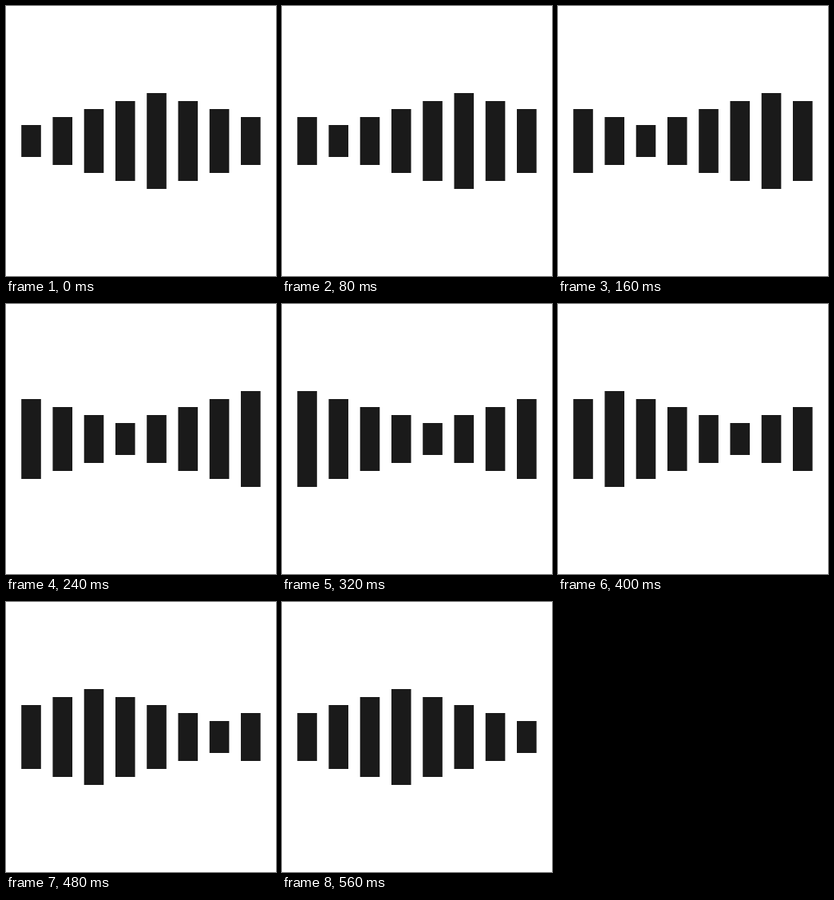
Recreate the animation shown at these times as an HTML page. Size 338 px wide and 338 px high, loop 640 ms.

```html
<!DOCTYPE html>
<html lang="en">
<head>
<meta charset="utf-8">
<title>Wave bars</title>
<style>
  html, body { margin: 0; width: 100%; height: 100%; overflow: hidden; background: #fff; }
  svg { display: block; width: 100%; height: 100%; }
  rect { fill: #1a1a1a; transform-origin: 0 169px; }
</style>
</head>
<body>
<svg id="stage" viewBox="0 0 338 338"></svg>
<script>
const COUNT = 8, STEP_MS = 80;
const LEFT = 19.2, PITCH = 39.26, WIDTH = 24.6;
const CENTER = 169, MAX_HEIGHT = 120;

// The triangle wave runs from 40 up to 120 and back, one bar to the right per step.
const heightAt = (bar, step) => {
  const phase = (bar - step + COUNT) % COUNT;
  return MAX_HEIGHT - 20 * Math.abs(4 - phase);
};

const stage = document.getElementById("stage");
for (let bar = 0; bar < COUNT; bar++) {
  const rect = document.createElementNS("http://www.w3.org/2000/svg", "rect");
  const box = { x: LEFT + bar * PITCH, y: CENTER - MAX_HEIGHT / 2, width: WIDTH, height: MAX_HEIGHT };
  for (const [name, value] of Object.entries(box)) rect.setAttribute(name, value);
  stage.append(rect);

  const keyframes = Array.from({ length: COUNT + 1 }, (_, step) => ({
    offset: step / COUNT,
    easing: "steps(1, end)",
    transform: `scaleY(${heightAt(bar, step % COUNT) / MAX_HEIGHT})`
  }));
  rect.animate(keyframes, { duration: COUNT * STEP_MS, iterations: Infinity });
}
</script>
</body>
</html>
```
